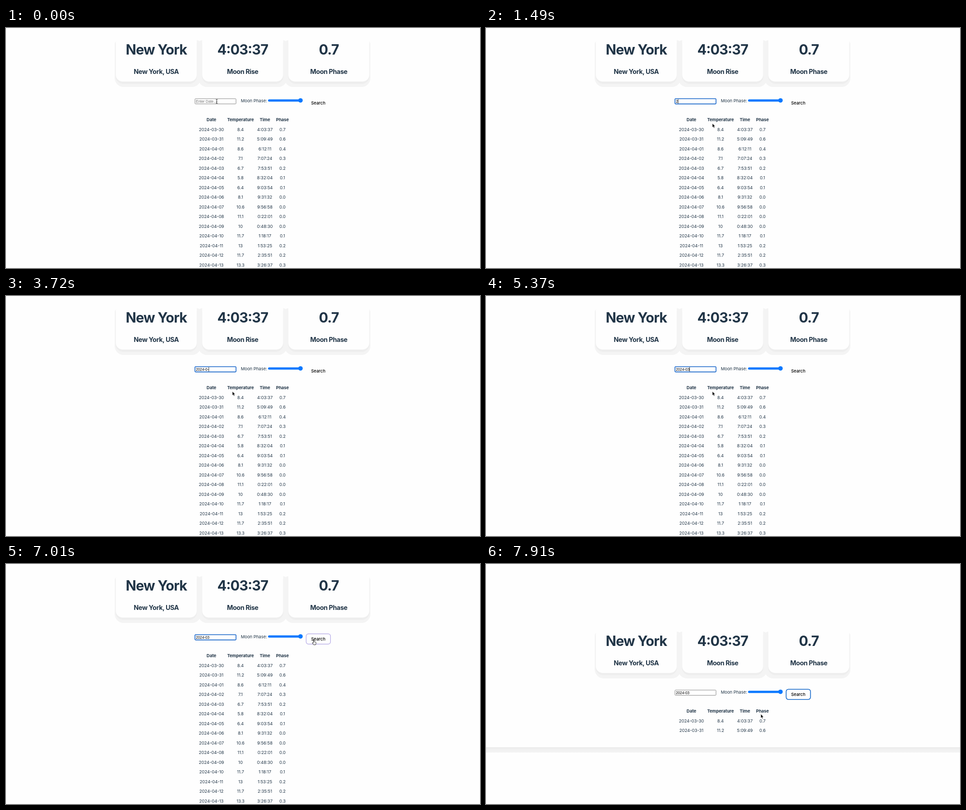
Animation of 1051 by 533 pixels, one loop 8 s. Source, as an HTML page:

```html
<!DOCTYPE html>
<html lang="en">
<head>
<meta charset="utf-8">
<title>Moon dashboard</title>
<style>
  html, body { margin: 0; width: 100%; height: 100%; overflow: hidden; background: #fefefe; }
  svg { display: block; width: 1051px; height: 533px; }
  text {
    font: 400 9.5px Inter, "Open Sans", sans-serif;
    font-optical-sizing: none;
    font-feature-settings: "calt" 1;
    letter-spacing: -.004em;
    fill: #213547;
  }
  .mid { text-anchor: middle; }
  .big { font-size: 30.6px; font-weight: 700; letter-spacing: -.03em; }
  .sub { font-size: 14.4px; font-weight: 700; letter-spacing: -.03em; }
  .head { font-weight: 700; }
  .button { font-weight: 500; fill: #000; }
  .field { font: 400 8.2px "Liberation Sans", Arial, sans-serif; letter-spacing: 0; }
</style>
</head>
<body>
<svg id="stage" viewBox="0 0 1051 533">
  <defs>
    <linearGradient id="fade" x1="0" y1="0" x2="0" y2="1">
      <stop offset="0" stop-color="#e9e9e9"/>
      <stop offset=".3" stop-color="#f0f0f0"/>
      <stop offset="1" stop-color="#f4f4f4"/>
    </linearGradient>
  </defs>
  <rect id="band" y="407" width="1051" height="11.7" fill="url(#fade)"/>
  <g id="page"></g>
  <g id="pointer">
    <path id="arrow" d="M0 0V8.8L2 7 3.4 10.2 4.9 9.5 3.5 6.4H6.2Z" fill="#000" stroke="#fff" stroke-width=".6"/>
    <path id="beam" d="M-1.8-4.6Q0-4.6 0-3.4Q0-4.6 1.8-4.6M0-3.4V3.4M-1.8 4.6Q0 4.6 0 3.4Q0 4.6 1.8 4.6M-1 .9H1" fill="none" stroke="#222" stroke-width="1"/>
    <path id="hand" d="M-.9 6V1Q-.9 0 0 0T.9 1V4Q1.7 3.4 2.4 4.2Q3.3 3.7 3.8 4.6Q5 4.3 5 5.6V7.6Q4.8 9 4.1 10.6H-.3Q-1.3 9-2.9 7Q-3.3 6-2.3 5.8Q-1.6 5.8-.9 6.8Z" fill="#fff" stroke="#111" stroke-width=".9" stroke-linejoin="round"/>
  </g>
</svg>
<script>
const LOOP = 8000, SUBMIT = 7160, SHIFT = 123;
const $ = id => document.getElementById(id);
const page = $("page");

function add(tag, attrs, text = "") {
  const el = document.createElementNS("http://www.w3.org/2000/svg", tag);
  for (const key in attrs) el.setAttribute(key, attrs[key]);
  el.textContent = text;
  return page.appendChild(el);
}
const label = (x, y, cls, text) => add("text", { x, y, class: cls }, text);
const box = (x, y, width, height, rx, fill, more) =>
  add("rect", { x, y, width, height, rx, fill, ...more });
const show = (el, on) => el.setAttribute("visibility", on ? "visible" : "hidden");

// Cards with merged shadows
const cards = [
  [243.5, "New York", "New York, USA"],
  [435, "4:03:37", "Moon Rise"],
  [626, "0.7", "Moon Phase"]
];
const CARD_W = 179.5;

function slab(left, right, top, bottom, rTop, r, fill) {
  add("path", { fill, d: `M${left} ${top + rTop}q0-${rTop} ${rTop}-${rTop}H${right - rTop}q${rTop} 0 ${rTop} ${rTop}` +
    `V${bottom - r}a${r} ${r} 0 0 1-${r} ${r}H${left + r}a${r} ${r} 0 0 1-${r}-${r}Z` });
}
cards.forEach(([x], i) =>
  slab(x - (i ? 9 : 2.5), x + CARD_W + (i < 2 ? 9 : 2.5), 27, 131, 10, 20, "#f4f4f4"));
cards.forEach(([x]) => slab(x - .6, x + CARD_W + .6, 30, 124, 8, 17, "#eeeeee"));
cards.forEach(([x, big, sub]) => {
  slab(x, x + CARD_W, 20, 119, 4, 15, "#fefefe");
  label(x + CARD_W / 2, 59.4, "mid big", big);
  label(x + CARD_W / 2, 101.7, "mid sub", sub);
});

// Search form
const field = box(419, 157, 91, 11.6, 1.5, "#fff", {});
const entry = label(421, 165.8, "field", "");
const caret = box(0, 158.2, .9, 9.4, 0, "#000");
label(520.7, 165.4, "", "Moon Phase:");
box(581, 158.4, 76, 5, 2.5, "#0a78ff");
add("circle", { cx: 653, cy: 160.8, r: 4.9, fill: "#0a78ff" });
const button = box(665.5, 155.2, 54, 22.6, 5, "#fefefe");
label(692.3, 169.9, "mid button", "Search");

// Table
const columns = [455.5, 520, 574, 613];
const row = (y, cells, cls) => cells.map((c, i) => label(columns[i], y, "mid " + cls, c));
row(207.1, ["Date", "Temperature", "Time", "Phase"], "head");
const readings = `8.4 4:03:37 0.7|11.2 5:09:49 0.6|8.6 6:12:11 0.4|7.1 7:07:24 0.3|6.7 7:53:51 0.2
|5.8 8:32:04 0.1|6.4 9:03:54 0.1|8.1 9:31:32 0.0|10.6 9:56:58 0.0|11.1 0:22:01 0.0
|10 0:48:30 0.0|11.7 1:18:17 0.1|13 1:53:25 0.2|11.7 2:35:51 0.2|13.3 3:26:37 0.3`;
const rows = readings.split("|").map((line, i) => {
  const date = new Date(Date.UTC(2024, 2, 30 + i)).toISOString().slice(0, 10);
  return row(228.7 + i * 21.5, [date, ...line.trim().split(" ")], "");
});

// Each step holds until the next one
const typing = [[0, ""], [1490, "2"], [1630, "20"], [1780, "202"], [1930, "2024"], [2980, "2024-"],
  [3570, "2024-0"], [3720, "2024-0-"], [4770, "2024-0"], [5370, "2024-03"]];
const blink = [[0, 0], [450, 1], [1040, 0], [1490, 1], [2530, 0], [2980, 1], [4170, 0],
  [4770, 1], [5220, 0], [5370, 1], [5970, 0], [6410, 1], [6860, 0]];
const moves = [[0, 467.3, 163, "beam"], [600, 470, 164, "beam"], [740, 485, 187, "arrow"], [890, 499, 218, "arrow"],
  [1040, 502, 212, "arrow"], [6270, 522, 204, "arrow"], [6410, 566, 190, "arrow"], [6560, 624, 178, "arrow"],
  [6710, 662, 171, "arrow"], [6860, 682.3, 168.8, "hand"], [7160, 682, 168.5, "arrow"],
  [7460, 664, 230, "arrow"], [7610, 628, 308, "arrow"], [7760, 611, 340, "arrow"], [7910, 609.3, 333.3, "arrow"]];
const borders = [[0, "none"], [6860, "#d3ccf2"], [7010, "#aea2e4"], [SUBMIT, "#0b62c8"]];
const at = (steps, t) => steps.findLast(s => s[0] <= t);

function draw(t) {
  const done = t >= SUBMIT, focused = t >= 450 && !done;
  page.setAttribute("transform", `translate(0 ${done ? SHIFT : 0})`);
  show($("band"), done);
  rows.slice(2).flat().forEach(cell => show(cell, !done));

  const text = at(typing, t)[1];
  entry.textContent = text || "Enter Date...";
  entry.style.fill = text ? "#000" : "#757575";
  show(caret, at(blink, t)[1]);
  caret.setAttribute("x", 421 + (text ? entry.getComputedTextLength() : 0));
  field.setAttribute("stroke", focused ? "#0f60c8" : "#767676");
  field.setAttribute("stroke-width", focused ? 1.6 : .9);

  button.setAttribute("stroke", at(borders, t)[1]);
  button.setAttribute("stroke-width", done ? 1.6 : 1.2);

  const [, x, y, kind] = at(moves, t);
  $("pointer").setAttribute("transform", `translate(${x} ${y})`);
  for (const id of ["arrow", "beam", "hand"]) show($(id), id === kind);
}

const start = performance.now();
function tick() {
  draw((performance.now() - start) % LOOP);
  requestAnimationFrame(tick);
}
tick();
</script>
</body>
</html>
```
